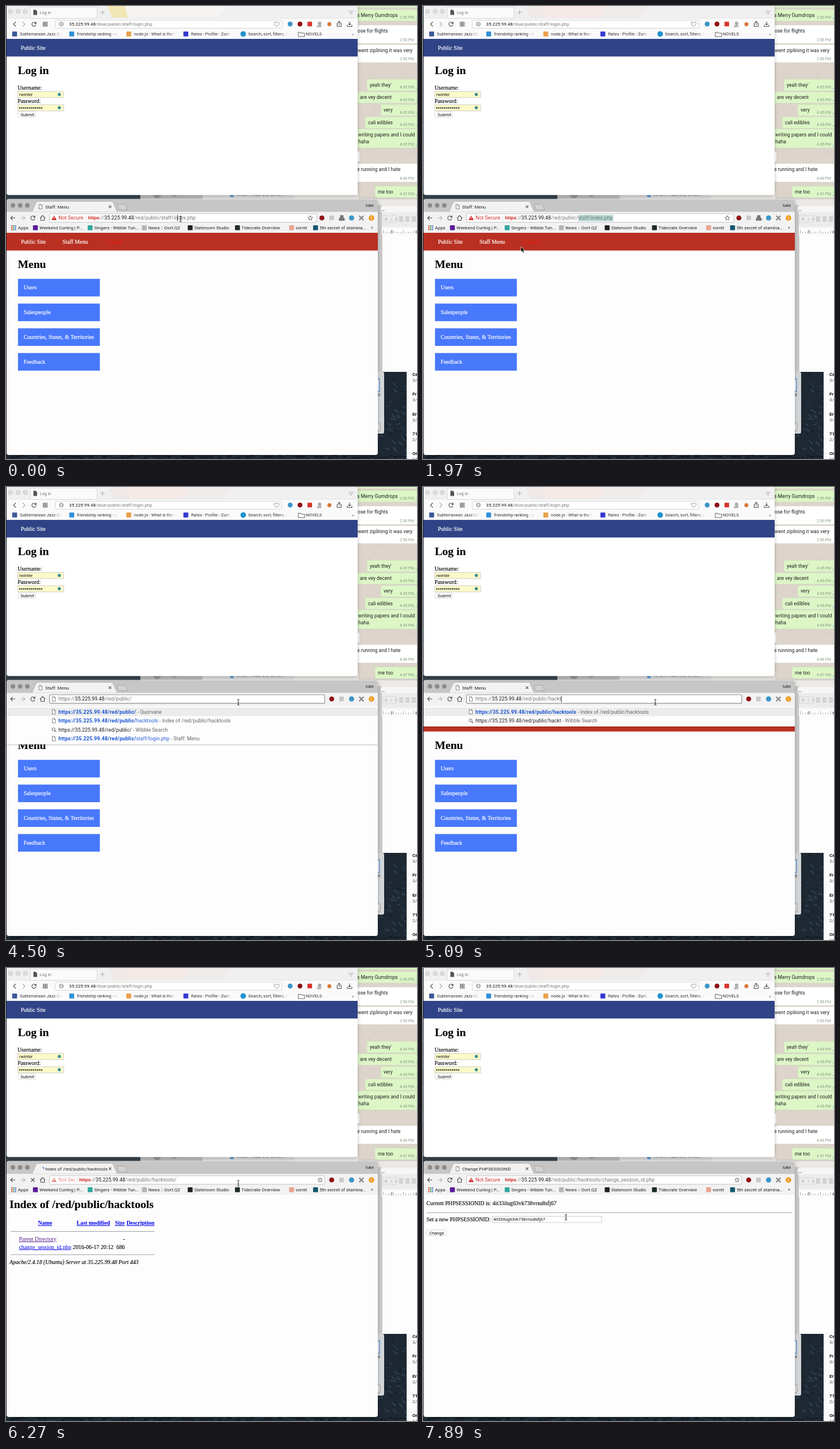
Write an HTML page that moves like this. It is 713 px wide and 785 px high and loops after 8000 ms.

```html
<!DOCTYPE html>
<html lang="en">
<head>
<meta charset="utf-8">
<title>Session demo</title>
<style>
html, body { margin: 0; width: 100%; height: 100%; overflow: hidden; background: #27313b; }
svg { display: block; width: 100vw; height: 100vh; }
text { font-family: Roboto, Inter, sans-serif; white-space: pre; }
.s { font-family: "Liberation Serif", "Noto Serif", serif; stroke: #000; stroke-width: .12; }
.b { font-weight: bold; }
.w { stroke: #fff; stroke-width: .2; }
.n { stroke: none; }
.i { fill: none; stroke: #555; stroke-width: 1.1; }
.u { text-decoration: underline; }
</style>
</head>
<body>
<svg id="stage" viewBox="0 0 713 785" xmlns="http://www.w3.org/2000/svg"></svg>
<script>
const LOOP = 8000;
const HOST = '35.225.99.48';
const stage = document.getElementById('stage');

const rect = (x, y, w, h, fill, more = '') =>
  `<rect x="${x}" y="${y}" width="${w}" height="${h}" fill="${fill}" ${more}/>`;
const dot = (x, y, r, fill, more = '') => `<circle cx="${x}" cy="${y}" r="${r}" fill="${fill}" ${more}/>`;
const text = (x, y, size, str, fill = '#222', more = '') =>
  `<text x="${x}" y="${y}" font-size="${size}" fill="${fill}" ${more}>${str}</text>`;
const serif = (x, y, str, fill = '#000', cls = '', size = 9.8) =>
  text(x, y, size, str, fill, `class="s ${cls}"`);
const span = (str, fill, more = '') => `<tspan fill="${fill}" ${more}>${str}</tspan>`;
const path = (d, more = 'class="i"') => `<path d="${d}" ${more}/>`;
const square = (x, y, s, fill) => rect(x - s / 2, y - s / 2, s, s, fill, 'rx="1"');
const times = (n, fn) => Array.from({ length: n }, (_, i) => fn(i)).join('');

let seed = 7;
const rand = () => (seed = seed * 16807 % 2147483647) / 2147483647;

// ---------- shared icons ----------
const arrowLeft = (x, y, c) => path(`M${x + 4} ${y}h-8m3.5-3.5l-3.5 3.5 3.5 3.5`, `class="i" style="stroke:${c}"`);
const arrowRight = (x, y, c) => path(`M${x - 4} ${y}h8m-3.5-3.5l3.5 3.5-3.5 3.5`, `class="i" style="stroke:${c}"`);
const reload = (x, y) => path(`M${x + 3} ${y - 2}a3.6 3.6 0 1 0 .5 3`) + path(`M${x + 4.3} ${y - 4.5}v4h-4z`, 'fill="#555"');
const cross = (x, y, r, c, w = 1.1) =>
  path(`M${x - r} ${y - r}l${2 * r} ${2 * r}m0 ${-2 * r}l${-2 * r} ${2 * r}`, `stroke="${c}" stroke-width="${w}"`);
const sheet = (x, y) => path(`M${x - 2.7} ${y - 4}h3.4l2 2v6h-5.4zM${x + .7} ${y - 4}v2h2`, 'fill="#fff" stroke="#666" stroke-width=".8"');
const star = (x, y) => {
  const pts = times(10, i => {
    const a = Math.PI * (i / 5 - .5), r = i % 2 ? 1.9 : 4.4;
    return `${(x + r * Math.cos(a)).toFixed(1)},${(y + r * Math.sin(a)).toFixed(1)} `;
  });
  return `<polygon points="${pts}" fill="none" stroke="#555" stroke-width=".8"/>`;
};
const button = (x, y, w, str) =>
  rect(x, y, w, 10, '#fefefe', 'rx="2" stroke="#ccc" stroke-width=".7"') + text(x + 4.5, y + 7.7, 7.5, str, '#111');

// ---------- desktop and windows on the right ----------
function bubble(x, y, h, lines, time, fill = '#dcf6c6', pad = 5) {
  return rect(x, y, 720 - x, h, fill, 'rx="3" stroke="#c9c4b8" stroke-width=".4"') +
    lines.map((l, i) => text(x + pad, y + 12.8 + i * 11.8, 8.6, l)).join('') +
    text(683, y + h - 3.8, 6.8, time, '#8b9a86') +
    (fill === '#fff' ? '' : path(`M710 ${y + h - 5}l1.5 1.5 3-4`, 'fill="none" stroke="#6ab7e0" stroke-width=".8"'));
}

function desktop() {
  const doodles = times(70, () =>
    dot((600 + rand() * 113).toFixed(), (rand() * 334).toFixed(), (1 + rand() * 4).toFixed(1), 'none', 'stroke="#d3cac0" stroke-width=".7"'));
  const rocks = times(140, () => {
    const x = 640 + rand() * 73, y = 634 + rand() * 150, l = 2 + rand() * 6;
    const c = ['#2c3d4b', '#151e27', '#354857', '#1f2b37'][Math.floor(rand() * 4)];
    return path(`M${x.toFixed()} ${y.toFixed()}l${l.toFixed()} ${(l * (rand() * 2 - .6)).toFixed()}`, `stroke="${c}" stroke-width="2.5" opacity=".7"`);
  });
  const strip = times(90, i => rect(i * 8, (778 + rand() * 5).toFixed(1), 6, 2, rand() > .5 ? '#0e161e' : '#2a3a48'));
  const entries = [['Ca', '3/'], ['Fr', '3/'], ['Er', '3/'], ['71', '2/'], ['Or', '11']];
  return rect(0, 0, 713, 785, '#1d2833') + rocks + strip +
    rect(600, 0, 113, 334, '#ddd5cb') + doodles +
    rect(600, 0, 113, 2.5, '#dcf6c6') +
    bubble(604, 6, 20, ['s Merry Gumdrops'], '2:56 PM') +
    bubble(604, 33, 32, ['ose for flights'], '2:56 PM', '#fff', 6) +
    bubble(604, 67, 31, ['went ziplining it was very'], '2:56 PM', '#fff', 6) +
    bubble(626, 127, 20, ["yeah they'"], '4:45 PM') +
    bubble(606, 148.5, 20, ['are vey decent'], '4:45 PM', '#dcf6c6', 8) +
    bubble(650, 170.5, 20, ['very'], '4:45 PM') +
    bubble(623, 192, 20, ['cali edibles'], '4:45 PM') +
    bubble(604, 213, 33, ['writing papers and I could', 'haha'], '4:45 PM', '#dcf6c6', 7) +
    rect(600, 252, 13, 18, '#fff', 'rx="3"') +
    bubble(604, 273, 32, ['e running and I hate'], '4:46 PM', '#fff', 5) +
    bubble(640, 312, 20, ['me too'], '4:47 PM') +
    rect(640, 334, 73, 11, '#ebe8e5') +
    rect(640, 345, 73, 289, '#c9c9c9') +
    rect(652, 345, 61, 52, '#ececec') + rect(650, 347, 63, 10, '#f6f6f6', 'rx="3"') + rect(651, 354, 6, 1, '#999') +
    text(657, 371.5, 7, 'B', '#aaa') + text(668, 371.5, 7, 'I', '#aaa') + text(675, 371.5, 7, 'U', '#aaa') +
    rect(653, 363, 24, 12, 'none', 'stroke="#d2d2d2" stroke-width=".8"') +
    times(3, i => times(4, j => rect(682 + i * 11, 365 + j * 2.4, 7, 1, '#b0b0b0'))) +
    rect(652, 383, 61, 14, '#f8f8f8') + rect(652, 387, 61, 8, '#fff') +
    times(14, i => rect(654 + i * 4.4, i % 4 ? 391 : 388, .7, i % 4 ? 3 : 6, '#888')) + text(667, 393.5, 6.5, '5', '#555') + text(710, 393.5, 6.5, '6', '#555') +
    rect(653, 397, 60, 237, '#fdfdfd') +
    rect(640, 634, 16, 107, '#d3d6d8', 'rx="3"') + rect(640, 646, 8, 22, '#e8ecf0', 'stroke="#4580c5" stroke-width="1.2"') + text(645, 676, 7, 'd', '#333') +
    rect(643, 722, 6, 14, '#e4e4e4', 'rx="2" stroke="#999"') +
    rect(695, 634, 18, 151, '#fbfbfb') +
    entries.map((e, i) => text(705, 641 + i * 34.3, 8, e[0], '#111', 'class="b"') + text(705, 651 + i * 34.3, 8, e[1], '#555')).join('') +
    // strip between the two browsers
    rect(0, 320, 233, 16, '#36424b') + rect(233, 320, 108, 16, '#bdbdbd') + dot(262, 326, 7, '#969696') + dot(292, 326, 5, '#a5a5a5') +
    rect(341, 320, 159, 16, '#dedede') + dot(392, 328, 3.5, '#5b9bd6') + text(400, 329, 9, 'Wish I had the time...', '#555') +
    rect(500, 320, 111, 16, '#ece9e6') + rect(611, 332, 102, 3, '#d5d0ca');
}

// ---------- upper browser ----------
function upper() {
  const marks = [
    [24, '#3b5998', 'Subterranean Jazz Cor', 97], [123, '#2f8fd8', 'friendship ranking - s', 194],
    [222, '#e8a04a', 'node.js - What is the l', 295], [321, '#3438d0', 'Rates - Profile - Zum', 393],
    [420, '#1f93cf', 'Search, sort, filters, l', 489]];
  return rect(1, -6, 609, 333.5, '#fff', 'rx="4" filter="url(#shadow)"') +
    rect(1, 0, 609, 22, '#f0f0f0') + rect(1, 21, 609, 36, '#fafafa') + rect(1, 20.7, 609, .7, '#d8d8d8') +
    [8, 21, 33.5].map(x => dot(x, 9.5, 4, '#dcdcdc', 'stroke="#cacaca" stroke-width=".6"')).join('') +
    '<g id="tint"></g>' +
    rect(42, 2, 116, 19.5, '#fafafa', 'stroke="#cfcfcf" stroke-width=".8"') +
    path('M47.5 6.5h4l2.5 2.5v6.5h-6.5z', 'fill="#555"') + text(58.5, 13.8, 7.3, 'Log in', '#777') +
    path('M163.5 11h8m-4-4v8', 'stroke="#aaa"') +
    path('M594 9h9m-7.5 2.5h6m-4.5 2.5h3', 'stroke="#aaa" stroke-width=".9"') +
    path('M17 27.5l-4 4 4 4') + path('M29 27.5l4 4-4 4', 'class="i" style="stroke:#aaa"') + reload(48.5, 31.5) +
    times(4, i => rect(64.5 + i % 2 * 4.2, 28 + (i >> 1) * 4.2, 2.8, 2.8, 'none', 'stroke="#555" stroke-width=".9"')) +
    rect(85.5, 24.5, 393, 14, '#fff', 'rx="2" stroke="#c9c9c9" stroke-width=".8"') +
    dot(96, 31.3, 3.6, 'none', 'stroke="#777" stroke-width=".8"') +
    path('M92.4 31.3h7.2M96 27.7c-2.5 2-2.5 5 0 7.2c2.5-2 2.5-5 0-7.2', 'fill="none" stroke="#777" stroke-width=".6"') +
    text(109.5, 34.3, 7.9, HOST + span('/blue/public/staff/login.php', '#777'), '#111') +
    path('M469.5 35.5c-7-4.5-4-9-1.5-7.5l1.5 1.5 1.5-1.5c2.5-1.5 5.5 3-1.5 7.5z', 'fill="none" stroke="#777" stroke-width=".8"') +
    dot(493, 31.3, 4.2, '#3b95c9') + dot(510, 31.3, 4.2, '#8e1214') + square(527, 31.3, 8, '#d8352c') +
    dot(544, 30, 3, '#aaa') + text(539.5, 37, 4.5, 'OFF', '#333') + dot(561, 31.5, 3.5, '#d9793c') +
    path('M576 30h-1.5v5.5h7v-5.5h-1.5M578 33v-6.5m-2 2l2-2 2 2') + path('M592 32.5v3h8v-3M596 27v6m-2.3-2.3l2.3 2.3 2.3-2.3') +
    marks.map(([x, c, s, end], i) =>
      (i === 4 ? dot(x - 8.5, 48.5, 4.8, c) : square(x - 9, 48.5, 8.5, c)) +
      text(x, 51.3, 7.5, s, '#333') + rect(end - 14, 43, 14, 12, 'url(#fade)') + rect(end, 43, 8, 12, '#fafafa')).join('') +
    path('M507 45.5h4l1 1.5h6v6h-11z', 'fill="none" stroke="#555" stroke-width=".9"') + text(520, 51.3, 7.5, 'NOVELS', '#333') +
    text(600, 51.5, 8, '»', '#666') +
    rect(1, 57, 609, 30.5, '#2f4386') + serif(25.8, 76, 'Public Site', '#fff', 'w') +
    serif(20.5, 118, 'Log in', '#000', 'b', 19.6) + serif(20, 145, 'Username:') + serif(20, 168, 'Password:') +
    [148, 171].map(y => rect(20.5, y, 79.5, 10.8, '#fbfac8', 'stroke="#c4c4c4" stroke-width=".8"') + dot(92.5, y + 5.3, 2.7, '#3b8d97')).join('') +
    text(23, 156, 7.5, 'rwinter', '#111') + times(12, i => dot(24 + i * 3.45, 176.6, 1.2, '#111')) +
    button(20.8, 183.2, 30, 'Submit');
}

// ---------- lower browser: fixed parts ----------
function lower() {
  const marks = [[58, '#5c1a9c', 'Weekend Curling | P...'], [153, '#2fa7a0', 'Singers - Wibble Tun...'], [247, '#b5b5b5', 'News :: Oort.QZ'],
    [326.5, '#222', 'Slateroom Studio'], [408.5, '#1d2b2a', 'Tidecrate Overview'], [502.5, '#e9a48f', 'vornit'], [544, '#14586e', '5th secret of stamina...']];
  return rect(1, 334.5, 644, 443.5, '#fdfdfd', 'rx="4" filter="url(#shadow)"') +
    path('M1 357v-18q0-4 4-4h636q4 0 4 4v18z', 'fill="#c6c6c6"') +
    [12, 24.5, 37].map(x => dot(x, 345.5, 3.9, '#8b8b8b')).join('') +
    path('M45 357l7-16q1-2.5 3-2.5h128q2 0 3 2.5l7 16z', 'fill="#f2f2f2" stroke="#a5a5a5" stroke-width=".7"') +
    path('M193 343.5h14l4 9.5h-14q-1.5 0-2-1z', 'fill="#d2d2d2" stroke="#9a9a9a" stroke-width=".7"') +
    cross(180.5, 347.8, 2.1, '#555') + text(624, 348.3, 7.8, 'luke', '#222') +
    rect(1, 356.8, 644, 36.2, '#f2f2f2') +
    arrowLeft(12, 367.3, '#444') + arrowRight(29, 367.3, '#b5b5b5') +
    path('M59 367.5l4.5-4.5 4.5 4.5M60.5 367v4.5h6v-4.5') +
    times(9, i => rect(9 + i % 3 * 3.2, 380 + Math.floor(i / 3) * 3.2, 2.2, 2.2, ['#d94f3d', '#4f9a52', '#4a7fd6'][i % 3])) +
    text(20.8, 387.2, 7.9, 'Apps') +
    marks.map(([x, c, s]) => square(x - 7, 384.3, 8.5, c) + text(x, 387.2, 7.9, s)).join('') + text(633, 387.2, 9, '»', '#444') +
    dot(599.5, 367.3, 4.5, '#3b95c9') + cross(616.5, 367.3, 3.8, '#8a8a8a', 2.3) +
    dot(634, 367.3, 4.8, '#f09a1a') + text(632.8, 370.4, 8, '!', '#fff', 'class="b"');
}

// ---------- pages ----------
const pages = {
  menu: () => rect(1, 393, 644, 30.7, '#b93022') +
    serif(26, 412, 'Public Site', '#fff', 'w') + serif(98, 412, 'Staff Menu', '#fff', 'w') + serif(174, 412, 'Logout', '#f0160f', 'n') +
    serif(20.5, 454.3, 'Menu', '#000', 'b', 19.6) +
    ['Users', 'Salespeople', 'Countries, States, &amp; Territories', 'Feedback'].map((s, i) =>
      rect(20.8, 472.8 + i * 42.85, 142, 30.5, '#4878fb') + serif(30.7, 491.3 + i * 42.85, s, '#fff', 'w')).join(''),
  index: () => serif(6, 415.7, 'Index of /red/public/hacktools', '#000', 'b', 19.6) +
    [[55.5, 'Name'], [122.5, 'Last modified'], [189, 'Size'], [209, 'Description']].map(([x, s]) => serif(x, 445, s, '#00e', 'b u n')).join('') +
    rect(8, 456, 249.5, 1, '#a0a0a0') + rect(8, 496.3, 249.5, 1, '#a0a0a0') +
    serif(22.5, 473, 'Parent Directory', '#551a8b', 'u n') + serif(203, 473, '-') +
    serif(22.5, 486.6, 'change_session_id.php', '#00e', 'u n') + serif(116, 486.6, '2016-06-17 20:12') + serif(191.5, 486.6, '686') +
    text(6, 513.2, 9.8, `Apache/2.4.18 (Ubuntu) Server at ${HOST} Port 443`, '#000', 'class="s" font-style="italic"'),
  session: () => serif(6, 411.4, 'Current PHPSESSIONID is: 4it33ilug63vk738vrsu8sfj67') +
    rect(6, 423.5, 634, 1, '#a5a5a5') + serif(6, 438.7, 'Set a new PHPSESSIONID:') +
    rect(120, 430.3, 190, 10.7, '#fff', 'stroke="#c4c4c4" stroke-width=".8"') +
    text(122, 438.4, 7.3, '4it33ilug63vk738vrsu8sfj67', '#111') + button(6.5, 453.8, 33.5, 'Change')
};
const titles = { menu: 'Staff: Menu', index: 'Index of /red/public/hacktools', session: 'Change PHPSESSIONID' };
const urls = { menu: 'staff/index.php', index: 'hacktools/', session: 'hacktools/change_session_id.php' };

// ---------- suggestion list ----------
function suggestions(typed) {
  const base = `https://${HOST}/red/public/`;
  const bold = s => span(s, '#1a55d0', 'font-weight="bold" letter-spacing=".2"');
  const link = s => span(s, '#2a62d8');
  const note = s => span(' - ' + s, '#666');
  const find = span(base + typed, '#222') + note('Wibble Search');
  const index = note('Index of /red/public/hacktools');
  const rows = typed
    ? [bold(base + 'hacktools') + index, find]
    : [bold(base) + note('Quorvane'), bold(base) + link('hacktools') + index, find, bold(base) + link('staff/login.php') + note('Staff: Menu')];
  const h = rows.length * 15.5 + 5;
  return rect(1, 378, 644, 3, '#f2f2f2') + rect(1, 380, 644, h - 1, '#fdfdfd', 'filter="url(#drop)"') + rect(1, 382, 644, 15, '#ececec') +
    rows.map((r, i) => {
      const y = 389.5 + i * 15.5;
      const icon = r === find ? dot(82.5, y - .5, 2.6, 'none', 'stroke="#666"') + path(`M84.5 ${y + 1.5}l2.5 2.5`) : sheet(83, y);
      return icon + text(91, y + 3.1, 8.8, r);
    }).join('');
}

// ---------- pointer ----------
const moves = [ // start, end, x, y
  [0, 306, 331, 368], [306, 930, 268.5, 368], [1078, 1522, 184, 440], [1522, 1670, 170, 419],
  [1818, 1966, 170, 417], [2114, 2706, 403, 373], [6258, 6850, 90, 483], [7146, 7886, 248, 432]];

function pointerAt(q) {
  let x = 303, y = 369;
  for (const [a, b, tx, ty] of moves) {
    const u = Math.min(1, Math.max(0, (q - a) / (b - a))), e = u * u * (3 - 2 * u);
    x += (tx - x) * e;
    y += (ty - y) * e;
  }
  return { x, y };
}

function pointer({ x, y }, page) {
  const beam = y < 377 || (page === 'session' && x > 120 && y < 441);
  const d = beam ? 'M-2 -5q2 0 2 1.5v7q0 1.5-2 1.5M2 -5q-2 0-2 1.5M2 5q-2 0-2-1.5M-1 1h2'
    : 'M0 0v9.5l2.2-2 1.6 3.7 1.7-.7-1.6-3.6h3z';
  const look = beam ? 'fill="none" stroke="#222" stroke-width=".9"' : 'fill="#000" stroke="#fff" stroke-width=".7"';
  return path(d, `${look} transform="translate(${x.toFixed(1)} ${y.toFixed(1)})"`);
}

// ---------- changing parts of the lower browser ----------
function scene(q) {
  const k = Math.round((q - 930) / 148);
  const page = q < 6258 ? 'menu' : q < 7146 ? 'index' : 'session';
  const open = q >= 3446 && q < 5814;
  const loading = q >= 5814 && q < 6554;
  const plain = q >= 3446 && q < 6258;
  const typed = 'hacktools'.slice(0, Math.max(0, Math.min(9, Math.round((k - 24) * 9 / 8))));
  const grow = q < 3298 ? 0 : q < 3446 ? .2 : q < 3594 ? .65 : 1;
  const fresh = q >= 6258 && q < 6406;
  const shift = fresh ? -15 : 0;
  const at = pointerAt(q);

  let out = pages[page]();
  out += text(68, 350.5, 8, titles[page], '#222');
  out += loading
    ? path('M62.5 344.5a3.5 3.5 0 0 1 3 3', `fill="none" stroke="#4a7fd6" stroke-width="1.3" transform="rotate(${k * 70 + 20} 62 348)"`)
    : sheet(60, 347.8);
  out += loading ? cross(46.5, 367.3, 3, '#555', 1.3) : reload(46.5, 367.3);
  out += rect(75.5, 360, 463.5 + 14 * grow, 14.8, '#fff', `rx="2" stroke="${open ? '#8d9399' : '#b8b8b8'}" stroke-width="${open ? 1.2 : .8}"`);
  out += dot(548 + 17 * grow, 367.3, 4.3, '#8e1214') + square(565 + 17 * grow, 367.3, 8, '#c9c9c9');
  if (!grow) out += path('M578 367.5h9v4h-9zM580 367v-4h5v4', 'fill="#777" stroke="#666" stroke-width=".8"');
  if (!open) out += star(528 + 17 * grow, 367.5);

  if (plain) {
    out += sheet(83, 367.3) + text(91, 370.4, 8.8, 'https://' + span(HOST, '#111') + `/red/public/${typed}`, '#777', 'id="url"');
  } else {
    if (q >= 460 && q < 3446) {
      const left = Math.max(269.5, at.x);
      out += rect(q < 930 ? left : 269.5, 362, 330 - (q < 930 ? left : 269.5), 11, '#b5d9d3');
    }
    out += `<g opacity="${fresh ? .55 : 1}">` + path('M83.5 363l4.5 8h-9z', 'fill="#cf2f28"') + rect(83, 365.5, 1, 3, '#fff') +
      `<svg x="90" y="357" width="${45 + shift}" height="20" overflow="hidden">${text(1, 13.4, 8.8, 'Not Secure', '#cf2f28')}</svg></g>` +
      rect(138 + shift, 362.5, .7, 10, '#ccc') +
      text(142 + shift, 370.4, 8.8, span('https', '#cf2f28', 'text-decoration="line-through"') + '://' + span(HOST, '#111') + '/red/public/' + urls[page], '#777');
    if (q < 150) out += rect(297, 362, .9, 11, '#222');
  }
  if (open) out += suggestions(typed);
  if ((q >= 3890 && q < 4482) || (typed && open)) out += rect(218, 362, .9, 11, '#111', 'id="caret"');
  return out + pointer(at, page);
}

stage.innerHTML = `<defs>
  <linearGradient id="fade"><stop offset="0" stop-color="#fafafa" stop-opacity="0"/><stop offset="1" stop-color="#fafafa"/></linearGradient>
  <filter id="shadow" x="-5%" y="-5%" width="110%" height="112%"><feDropShadow dx="0" dy="2" stdDeviation="3" flood-opacity=".25"/></filter>
  <filter id="drop" x="0" y="0" width="100%" height="120%"><feDropShadow dx="0" dy="1" stdDeviation="1" flood-opacity=".25"/></filter>
</defs>` + desktop() + upper() + lower() + '<g id="live"></g>';

const live = document.getElementById('live');
const tint = document.getElementById('tint');

const tick = t => t < 150 ? 0
  : t < 930 ? 150 + 156 * Math.floor((t - 150) / 156)
  : 930 + 148 * Math.floor((t - 930) / 148);

let shown = -1;
function update(t) {
  const q = tick(t);
  if (q === shown) return;
  shown = q;
  live.innerHTML = scene(q);
  const caret = document.getElementById('caret');
  if (caret) caret.setAttribute('x', 91 + document.getElementById('url').getComputedTextLength());
  tint.innerHTML = q < 150
    ? path('M176 0h30l6 20h-28z', 'fill="#f2e6b4"') + path('M206 0h180l-20 20h-154z', 'fill="#f5f4f2"')
    : path('M178 0h30l6 20h-28z', 'fill="#eee9e6"') + path('M208 0h112l-16 20h-90z', 'fill="#f5e9e7"') + path('M320 0h74l-20 20h-70z', 'fill="#efebeb"');
}

const start = performance.now();
function frame() {
  update((performance.now() - start) % LOOP);
  requestAnimationFrame(frame);
}
frame();
</script>
</body>
</html>
```
